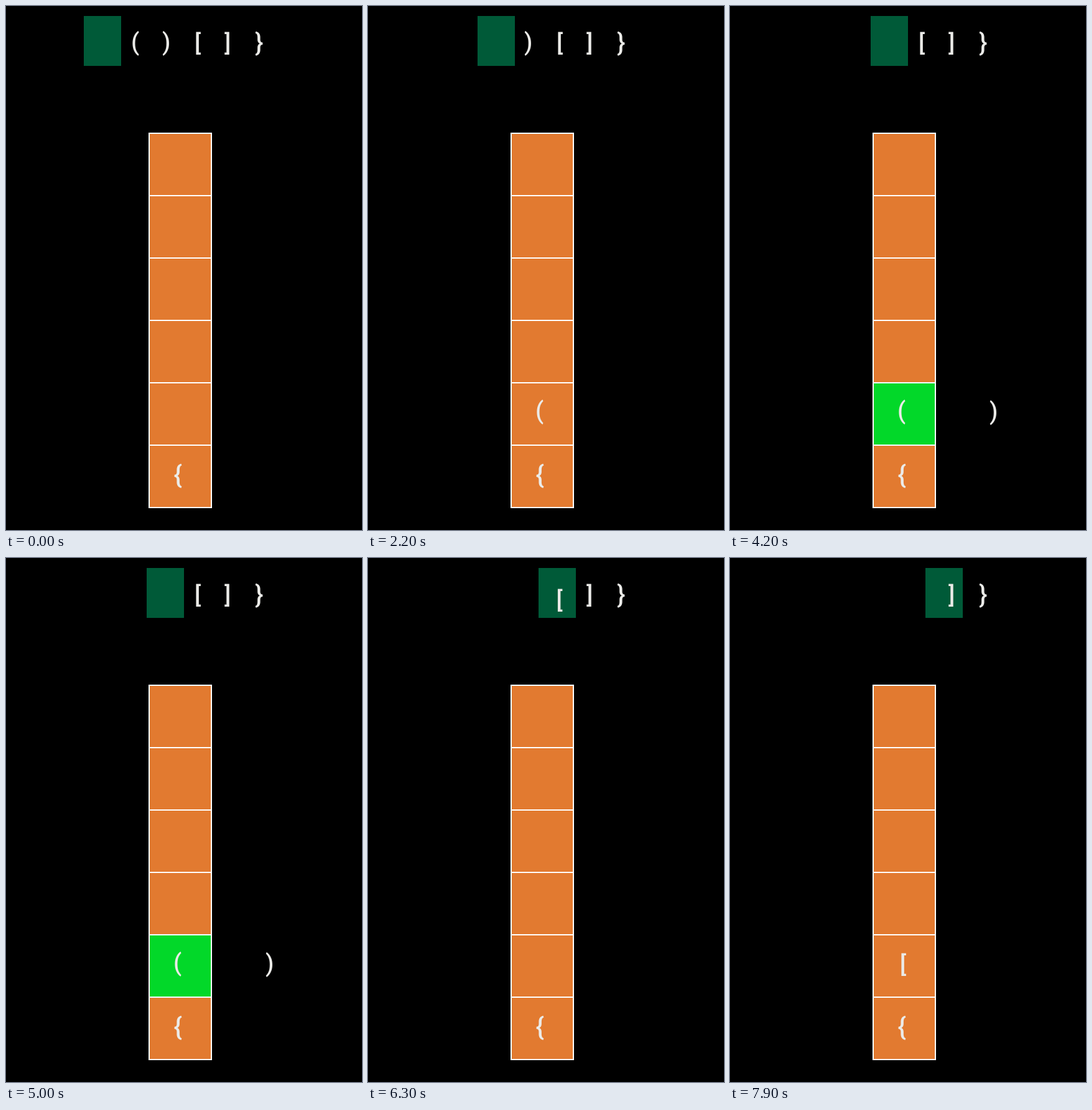
An HTML page with a canvas that plays this animation: 572 by 840 pixels, repeating every 8 s.

```html
<!DOCTYPE html>
<html lang="en">
<head>
<meta charset="utf-8">
<title>Bracket matching with a stack</title>
<style>
  html, body { margin: 0; width: 100%; height: 100%; overflow: hidden; background: #000; }
  canvas { display: block; }
</style>
</head>
<body>
<canvas id="stage" width="572" height="840"></canvas>
<script>
const ctx = document.getElementById('stage').getContext('2d');
const LOOP = 8000, TICK = 100;
const ORANGE = '#e27a30', MATCH = '#02d829', CURSOR = '#005a38', LINE = '#fff', INK = '#ebebe8';
const MATCH_ON = 4150, POP = 5100;

// Cursor moves: start, duration, from x, to x
const cursorMoves = [
  [240, 1000, 125, 176],
  [2160, 1150, 176, 226],
  [5120, 1100, 226, 274],
  [7180, 1020, 274, 324]
];

// Symbols: ink centre, ink height, optional flight and lifetime
const symbols = [
  { ch: '{', h: 39, at: [276.5, 752.5] },
  { ch: '(', h: 39, at: [208.5, 59.5], to: [276.5, 650], start: 1250, dur: 920, end: POP },
  { ch: ')', h: 39, at: [256.5, 59.5], to: [422.5, 651.5], start: 3290, dur: 860, end: POP },
  { ch: '[', h: 37, at: [309, 59.5], to: [279, 651], start: 6224, dur: 1000 },
  { ch: ']', h: 37, at: [355, 59.5] },
  { ch: '}', h: 39, at: [406.5, 59.5] }
];

const setFont = size => { ctx.font = `500 ${size}px Roboto, sans-serif`; };
const lerp = (a, b, p) => a + (b - a) * p;

function progress(t, start, dur) {
  const p = Math.min(1, Math.max(0, (t - start) / dur));
  return (1 - Math.cos(Math.PI * p)) / 2;
}

function cursorX(t) {
  let x = cursorMoves[0][2];
  for (const [start, dur, from, to] of cursorMoves) {
    if (t >= start) x = lerp(from, to, progress(t, start, dur));
  }
  return Math.round(x);
}

// Draws a character centred on its visible ink
function glyph(ch, h, cx, cy) {
  setFont(100);
  let m = ctx.measureText(ch);
  setFont(100 * h / (m.actualBoundingBoxAscent + m.actualBoundingBoxDescent));
  m = ctx.measureText(ch);
  ctx.fillStyle = INK;
  ctx.fillText(ch,
    cx + (m.actualBoundingBoxLeft - m.actualBoundingBoxRight) / 2,
    cy + (m.actualBoundingBoxAscent - m.actualBoundingBoxDescent) / 2);
}

function drawStack(t) {
  ctx.strokeStyle = LINE;
  ctx.lineWidth = 2;
  for (let i = 0; i < 6; i++) {
    const matched = i === 4 && t >= MATCH_ON && t < POP;
    ctx.fillStyle = matched ? MATCH : ORANGE;
    ctx.fillRect(230, 204 + i * 100, 100, 100);
  }
  for (let i = 0; i < 6; i++) ctx.strokeRect(230, 204 + i * 100, 100, 100);
}

function draw(t) {
  ctx.fillStyle = '#000';
  ctx.fillRect(0, 0, 572, 840);
  ctx.fillStyle = CURSOR;
  ctx.fillRect(cursorX(t), 16, 60, 80);
  drawStack(t);
  for (const s of symbols) {
    if (t >= s.end) continue;
    const p = s.to ? progress(t, s.start, s.dur) : 0;
    const [x, y] = s.to ? s.at.map((v, i) => lerp(v, s.to[i], p)) : s.at;
    glyph(s.ch, s.h, x, y);
  }
}

const origin = performance.now();
function frame() {
  const t = (performance.now() - origin) % LOOP;
  draw(Math.floor(t / TICK) * TICK);
  requestAnimationFrame(frame);
}
frame();
</script>
</body>
</html>
```
